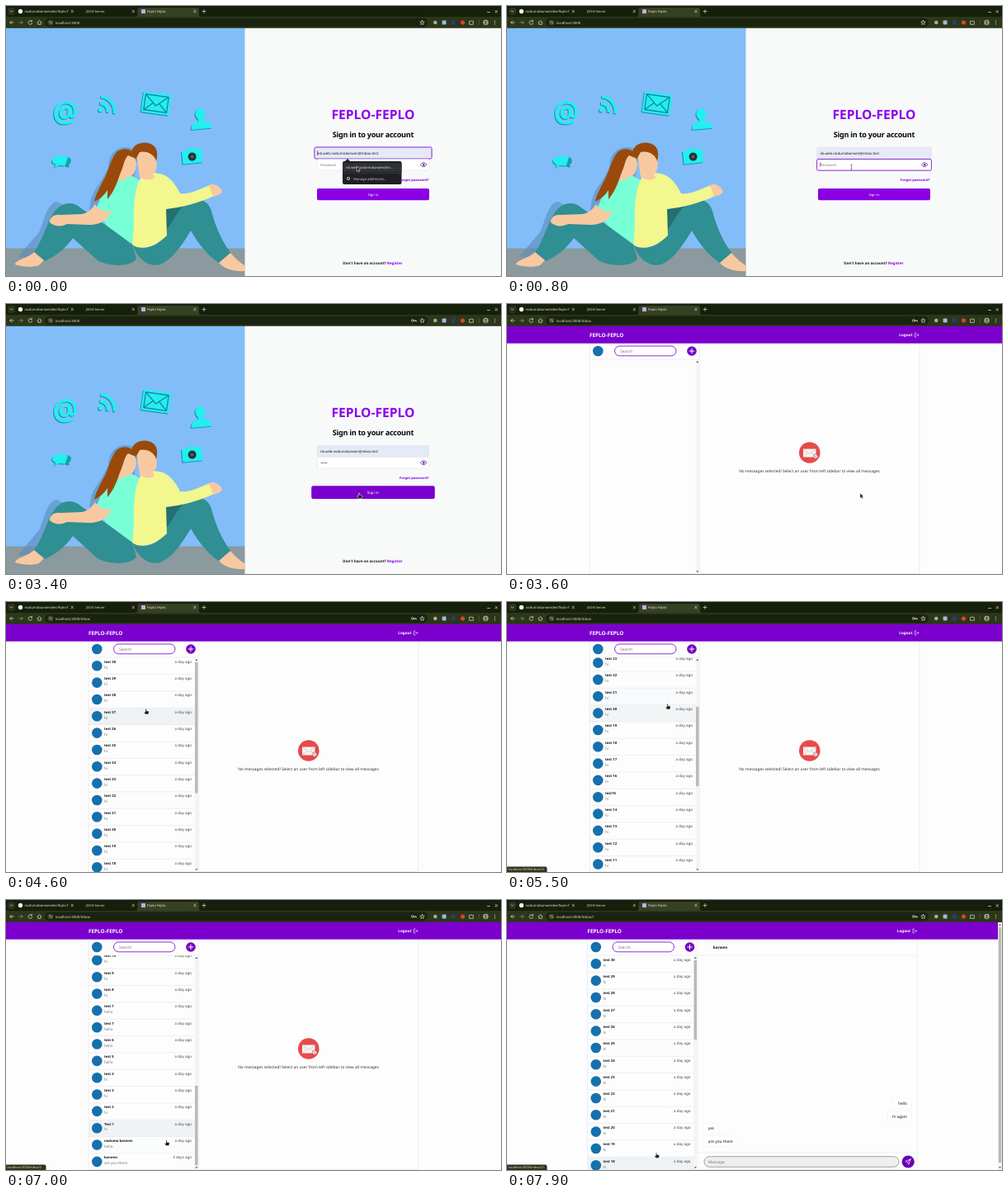
These frames come from a looping animation (600 px wide and 327 px high, 8 s). An HTML page:

```html
<!DOCTYPE html>
<html lang="en">
<head>
<meta charset="utf-8">
<title>Feplo Feplo</title>
<style>
  html, body { margin: 0; width: 100%; height: 100%; overflow: hidden; background: #f8faf9; }
  svg { display: block; width: 100vw; height: 100vh; }
  text { font-family: "Noto Sans", "Open Sans", sans-serif; font-size: 4.5px; fill: #17171b; text-rendering: geometricPrecision; }
  .b { font-weight: 700; }
  .m { font-weight: 600; }
  .mid { text-anchor: middle; }
  .end { text-anchor: end; }
  .purple { fill: #8e00ec; }
  .white { fill: #fff; }
  .grey { fill: #777; }
  .talk { font-size: 4.8px; }
  .ui { font-size: 4.2px; fill: #dfe4d2; }
  .line { fill: none; stroke: #dfe4d2; stroke-width: .7; stroke-linecap: round; stroke-linejoin: round; }
  .rule { stroke: #e3e5e8; stroke-width: .6; fill: none; }
  .skin { fill: #f8c9a0; }
  .teal { fill: #2f8f92; }
  .deep { fill: #24706f; }
  .hair { fill: #994a0a; }
  .shade { fill: #5c8cba; opacity: .6; }
  .icons { fill: #20f0ee; stroke: none; filter: drop-shadow(-1px 1px 0 #2389a8); }
  .stroke { fill: none; stroke: #20f0ee; stroke-width: 3.6; }
  .bubble { fill: #fff; stroke: #ececee; stroke-width: .5; }
</style>
</head>
<body>
<svg viewBox="0 0 600 327" preserveAspectRatio="none">
  <defs>
    <clipPath id="listClip"><rect x="100" y="67.3" width="133" height="260"/></clipPath>
    <clipPath id="artClip"><rect y="26" width="289.5" height="301"/></clipPath>
  </defs>

  <g id="login">
    <rect width="600" height="327" fill="#f8faf9"/>
    <g clip-path="url(#artClip)">
      <rect y="26" width="290" height="268" fill="#82bdfa"/>
      <rect y="293.5" width="290" height="34" fill="#8b9a9e"/>
      <g class="shade">
        <path d="M124 196C124 178 136 168 152 172L160 180 150 240 102 262C99 240 104 226 114 214Z"/>
        <path d="M86 250L62 237C50 238 47 258 40 274L14 304 40 304Z"/>
        <path d="M200 244L238 238 222 272 196 300Z"/>
      </g>
      <path class="teal" d="M158 306C152 316 128 316 112 309L81 281C72 294 60 303 47 309L34 298C45 283 49 263 58 250 66 238 81 235 91 245L119 264 152 285Z"/>
      <path class="skin" d="M34 298L46 308 40 314C32 317 20 316 11 313 12 307 26 306 34 298Z"/>
      <path d="M133 205C120 214 116 231 109 246 114 254 119 260 122 266L152 288 158 288 164 213C154 204 142 202 133 205Z" fill="#78ffd6"/>
      <path class="skin" d="M108 240C112 247 120 250 128 248 122 262 112 265 100 265L74 264C67 268 58 267 53 262 52 257 58 252 66 253L92 252C100 250 104 246 108 240Z"/>
      <path class="deep" d="M193 246L216 241 204 258 192 276Z"/>
      <path class="teal" d="M153 288C163 295 174 293 183 288 194 278 202 256 214 243 227 230 244 232 249 248 254 268 262 286 273 300L259 312C244 302 233 288 224 272 213 290 202 307 187 313 172 317 158 305 153 288Z"/>
      <path class="skin" d="M272 299C278 306 285 312 291 315V321C277 322 265 319 258 311Z"/>
      <path d="M165 206C157 215 154 240 155 266L153 289C164 297 181 292 195 278L194 246C212 244 233 239 252 230L247 217C234 222 222 229 211 227 206 217 200 208 190 204 180 201 171 202 165 206Z" fill="#f2f78e"/>
      <path class="skin" d="M246 217C252 214 259 218 262 224 260 230 255 229 251 231Z"/>
      <path class="skin" d="M158 179C167 173 179 177 182 185 184 195 182 201 178 203L180 208C175 212 168 211 162 207Z"/>
      <path class="hair" d="M152 179C152 169 162 164 172 166 183 168 185 178 182 188 180 180 171 175 162 177L158 184Z"/>
      <path class="skin" d="M136 186C142 175 156 178 158 190 158 202 152 208 146 208L140 212 131 208Z"/>
      <path class="hair" d="M158 185C156 173 142 170 134 177 126 186 124 202 117 213 112 223 108 230 107 237 115 233 120 228 123 223L123 234C130 226 135 214 138 204 143 194 143 185 148 181Z"/>
      <g class="icons">
        <text x="72" y="140.3" class="m mid" style="font-size:35px;fill:#20f0ee" transform="rotate(-8 72 130)">@</text>
        <g transform="translate(112.5 127.5) rotate(8)">
          <circle cx="2" cy="-2" r="2.8"/>
          <path class="stroke" d="M0-10A10 10 0 0 1 11 0M0-18A18 18 0 0 1 19 0"/>
        </g>
        <g transform="translate(182 118) rotate(8)">
          <rect x="-17" y="-12.5" width="34" height="25" rx="1"/>
          <path d="M-14-9.5H14V9.5H-14ZL0 3 14-9.5M-14 9.5L-4 0M14 9.5L4 0" fill="none" stroke="#2377a0" stroke-width="1.2"/>
        </g>
        <g transform="translate(236 137) rotate(-5)">
          <ellipse cy="-6" rx="6" ry="7"/>
          <path d="M-12.5 12C-12.5 4-7 5-3 2V-1H3V2C7 5 12.5 4 12.5 12Z"/>
        </g>
        <g transform="translate(225.5 181.5) rotate(-6)">
          <path d="M-12-7H-5L-3-9H4L6-7H12V9H-12Z"/>
          <circle r="5" cy="1" fill="#283038"/><circle r="2" cy="1" fill="#56606a"/>
        </g>
        <path d="M56 187C57 181 76 179 78 187 77 194 69 194 64 193L59 196 60 192C57 191 56 189 56 187Z"/>
        <path d="M75 183C80 184 80 190 76 192L77 195 72 193Z" fill="#159fae"/>
      </g>
    </g>

    <text x="445" y="136.6" class="mid purple" style="font-size:15.6px;font-weight:800">FEPLO-FEPLO</text>
    <text x="445" y="158.6" class="b mid" style="font-size:9.1px;letter-spacing:-.03em;fill:#08080c">Sign in to your account</text>
    <g id="email">
      <rect id="emailBox" x="377.3" y="171.3" width="135.4" height="13.4" rx="1.5" fill="#e5eaf7"/>
      <text x="381" y="179.6" style="font-size:4.15px">nb.web.nodumobarwen@mbox.test</text>
      <rect id="emailCaret" y="175.5" width=".5" height="5.5"/>
    </g>
    <g id="pass">
      <rect id="passBox" x="377.3" y="185.6" width="135.4" height="13.4" rx="1.5" fill="#fff"/>
      <text id="hint" x="381" y="193.6" class="grey" style="font-size:4.2px">Password</text>
      <g id="dots"></g>
      <rect id="passCaret" y="189.6" width=".5" height="5.2"/>
    </g>
    <path d="M502.4 192.2Q506.2 187.2 510 192.2 506.2 197.2 502.4 192.2Z" fill="none" stroke="#5a0f9c" stroke-width=".8"/>
    <circle cx="506.2" cy="192.2" r="1.2" fill="#5a0f9c"/>
    <text x="512.5" y="211.5" class="b end purple" style="font-size:4.05px">Forget password?</text>
    <g id="button">
      <rect id="buttonBox" x="377" y="221" width="136" height="14.2" rx="2"/>
      <text x="445" y="229.6" class="mid white" style="font-size:4.1px">Sign in</text>
    </g>
    <text x="444.5" y="312.7" class="b mid">Don't have an account? <tspan class="purple">Register</tspan></text>
    <g id="popup">
      <rect x="408" y="188" width="71.5" height="28" rx="2" fill="#1f2023"/>
      <rect x="408" y="190" width="71.5" height="11" fill="#303135"/>
      <path d="M408 202.5H479.5" stroke="#4a4b50" stroke-width=".5"/>
      <path d="M411 188L414 185 417 188Z" fill="#1f2023"/>
      <text x="412" y="196.8" style="font-size:4.1px;fill:#e4e4e6">nb.web.nodumobarwen@m…</text>
      <circle cx="415" cy="209" r="1.6" fill="none" stroke="#c9c9cc" stroke-width="1"/>
      <text x="421" y="210.6" style="font-size:4.2px;fill:#c9c9cc">Manage addresses...</text>
    </g>
  </g>

  <g id="inbox">
    <rect width="600" height="327" fill="#fdfdfd"/>
    <rect y="26" width="600" height="21.7" fill="#7c00cd"/>
    <g id="page">
      <text x="100" y="39.8" class="b white" style="font-size:6.4px">FEPLO-FEPLO</text>
      <text x="491.5" y="39.2" class="b end white" style="font-size:4.6px">Logout</text>
      <path d="M496.5 35H494.5V40H496.5M496 37.5H499M498 36.4L499.2 37.5 498 38.6" fill="none" stroke="#fff" stroke-width=".6"/>
      <path class="rule" d="M100 48V327M233.4 48V327M500 48V327M100 67H233M100 326.5H500"/>
      <circle cx="110.3" cy="57" r="6.3" fill="#1670ac"/>
      <rect x="130.5" y="51" width="74.5" height="11.8" rx="5.9" fill="#fff" stroke="#8417d0" stroke-width=".9"/>
      <text x="137" y="58.7" class="grey talk">Search</text>
      <circle cx="224" cy="57" r="5.8" fill="#7500c4"/>
      <path d="M220.8 57H227.2M224 53.8V60.2" stroke="#fff" stroke-width="1"/>
      <g clip-path="url(#listClip)">
        <g id="rows"></g>
        <rect x="228.7" y="67" width="4.5" height="260" fill="#f4f4f4"/>
        <rect id="thumb" x="229.1" width="3.4" fill="#b9b9bb"/>
        <path d="M229.5 71L230.9 69 232.3 71ZM229.5 323.2L230.9 325.2 232.3 323.2Z" fill="#555"/>
      </g>
      <g id="empty">
        <circle cx="366.8" cy="180" r="12.8" fill="#e84a4a"/>
        <path d="M359 175.5H374.5V185.5H359Z" fill="#f5f3f0"/>
        <path d="M359 175.5L366.8 181.5 374.5 175.5M359 185.5L364.5 180M374.5 185.5L369 180" fill="none" stroke="#cfc6c2" stroke-width=".7"/>
        <circle cx="374" cy="184.6" r="2.7" fill="#fff" stroke="#b0494f" stroke-width=".7"/>
        <path d="M372.8 183.4L375.2 185.8M375.2 183.4L372.8 185.8" stroke="#c33" stroke-width=".6"/>
        <text x="366.5" y="204" class="mid" style="font-size:4.82px;fill:#333">No messages selected! Select an user from left sidebar to view all messages</text>
      </g>
      <g id="chat">
        <path class="rule" d="M233 67H500M233 306H500"/>
        <text x="252.3" y="58.7" class="m" style="font-size:4.6px">barwen</text>
        <rect class="bubble" x="470" y="240" width="23" height="12.5" rx="1.5"/>
        <rect class="bubble" x="464" y="255.5" width="29" height="12.5" rx="1.5"/>
        <rect class="bubble" x="240.5" y="270.2" width="18" height="12.5" rx="1.5"/>
        <rect class="bubble" x="240.5" y="285.5" width="39" height="12.5" rx="1.5"/>
        <text x="487.5" y="248.2" class="end talk">hello</text>
        <text x="487.5" y="263.6" class="end talk">hi again</text>
        <text x="246.2" y="278.2" class="talk">yes</text>
        <text x="246.2" y="293.5" class="talk">are you there</text>
        <rect x="241.5" y="310.7" width="236" height="12.6" rx="6.3" fill="#efeff1" stroke="#8d8d92" stroke-width=".8"/>
        <text x="246.5" y="318.7" class="grey talk">Message</text>
        <circle cx="488.7" cy="317" r="7.6" fill="#6a00b4"/>
        <path d="M492 313.6L485.4 316.4 488 317.6 489.2 320.4ZM488 317.6L492 313.6" fill="none" stroke="#fff" stroke-width=".7"/>
      </g>
    </g>
    <g id="pageBar">
      <rect x="595" y="27" width="5" height="300" fill="#f4f4f4"/>
      <rect x="595.8" y="33" width="3.4" height="285" fill="#b9b9bb"/>
      <path d="M596.1 31L597.5 29 598.9 31ZM596.1 323L597.5 325 598.9 323Z" fill="#555"/>
    </g>
    <g id="status">
      <path d="M0 320.5H46.5Q48.5 320.5 48.5 322.5V327H0Z" fill="#2b351b"/>
      <text id="link" x="1.5" y="325.3" class="ui" style="font-size:3.9px"></text>
    </g>
  </g>

  <g id="browser">
    <rect width="600" height="13.5" fill="#161f0b"/>
    <rect y="13" width="600" height="13.8" fill="#2c3719"/>
    <path d="M157 13.2Q159.5 13 159.5 10.5V4.5Q159.5 2 162 2H231.5Q234 2 234 4.5V10.5Q234 13 236.5 13.2Z" fill="#364123"/>
    <rect x="2" y="2" width="9" height="9" rx="3" fill="#2a331a"/>
    <path class="line" d="M5 5.8L6.5 7.3 8 5.8"/>
    <circle cx="17.5" cy="6.5" r="2.7" fill="#f0f2ec"/>
    <text x="22.5" y="8" class="ui">nodumobarwendev/feplo-f</text>
    <text x="97" y="8" class="ui" style="font-size:4px">JSON Server</text>
    <rect x="164" y="4" width="5" height="5" rx=".6" fill="#c8a8f0"/>
    <text x="171" y="8" class="ui">Feplo Feplo</text>
    <path class="line" d="M79 5.2L81.6 7.8M81.6 5.2L79 7.8M153 5.2L155.6 7.8M155.6 5.2L153 7.8M227.6 5.2L230.2 7.8M230.2 5.2L227.6 7.8M238 6.5H242M240 4.5V8.5M583.5 7.5H586.5M593 5.5L595.6 8M595.6 5.5L593 8"/>
    <path class="line" d="M9.3 20H4.8M6.8 18L4.8 20 6.8 22"/>
    <path class="line" d="M15.8 20H20.2M18.2 18L20.2 20 18.2 22" opacity=".55"/>
    <path class="line" d="M31 18.4A2.3 2.3 0 1 0 31.6 20.6M31.4 17.3V18.8H29.9"/>
    <path class="line" d="M38 20L40.5 17.6 43 20M38.8 19.5V22.3H42.2V19.5"/>
    <rect x="47" y="14.8" width="464" height="10.4" rx="5.2" fill="#1a230f"/>
    <circle cx="54" cy="20" r="3.6" fill="#353e21"/>
    <path class="line" d="M52.4 19H53.8M54.6 21H55.8M55.3 19H55.4M52.8 21H52.9"/>
    <text id="url" x="60" y="21.6" class="ui" style="font-size:4.3px"></text>
    <g id="key"><circle class="line" cx="492.8" cy="20" r="1.4"/><path class="line" d="M494.3 20H497.3V21.3M496 20V21"/></g>
    <path class="line" d="M504.5 17.4L505.3 19.2 507.2 19.3 505.8 20.6 506.2 22.5 504.5 21.5 502.8 22.5 503.2 20.6 501.8 19.3 503.7 19.2Z"/>
    <circle cx="520.3" cy="20" r="2.3" fill="#a9aea0"/>
    <rect x="528.6" y="17.6" width="5" height="5" rx="1" fill="#9db8ea"/>
    <rect x="540" y="17.6" width="4.6" height="5" rx=".6" fill="#33357f"/>
    <circle cx="553.5" cy="20" r="2.6" fill="#d6462f"/>
    <path class="line" d="M563 18.5H564.3A1 1 0 0 1 566.2 18.5H567.3V22.3H563Z" transform="translate(-1 0)"/>
    <path d="M573.5 17V23" stroke="#5a6444" stroke-width=".6"/>
    <circle cx="581.5" cy="20" r="3.2" fill="#a9a79a"/><circle cx="581.5" cy="19.3" r="1.2" fill="#4d4a42"/><path d="M579.3 22.3Q581.5 19.3 583.7 22.3Z" fill="#4d4a42"/>
    <g fill="#dfe4d2"><circle cx="592.5" cy="18" r=".6"/><circle cx="592.5" cy="20" r=".6"/><circle cx="592.5" cy="22" r=".6"/></g>
  </g>

  <g id="cursor" stroke-linejoin="round">
    <path id="arrow" d="M0 0V6.2L1.5 5 2.5 7.2 3.5 6.7 2.5 4.6H4.4Z" fill="#111" stroke="#fff" stroke-width=".5"/>
    <path id="hand" d="M-.6 0Q0-.7.6 0V2.2L3 2.7Q3.8 3 3.6 4L3 6.4H-.6L-2.4 3.8Q-2 3-.6 4Z" fill="#111" stroke="#fff" stroke-width=".5"/>
    <path id="beam" d="M-1-2.8H1M0-2.8V2.8M-1 2.8H1" fill="none" stroke="#7a2436" stroke-width=".6"/>
  </g>
</svg>

<script>
const LOOP = 8000, STEP = 100, TOP = 67.3, PITCH = 20.33, VIEW = 260;
const $ = id => document.getElementById(id);
const show = (id, on) => $(id).setAttribute('display', on ? 'inline' : 'none');
const set = (id, attrs) => { for (const k in attrs) $(id).setAttribute(k, attrs[k]); };

// Eased value at time t from [time, value] stops
function track(stops, t) {
  if (t <= stops[0][0]) return stops[0][1];
  for (let i = 1; i < stops.length; i++) {
    const [t0, a] = stops[i - 1], [t1, b] = stops[i];
    if (t <= t1) {
      const p = (t - t0) / (t1 - t0);
      return a + (b - a) * p * p * (3 - 2 * p);
    }
  }
  return stops[stops.length - 1][1];
}

const mouseX = [[0, 425], [200, 425], [800, 417.5], [2400, 417.5], [3000, 428], [3800, 428], [4500, 169.5], [4800, 169.5], [5300, 194.5], [7600, 194.5], [7900, 181]];
const mouseY = [[0, 194], [200, 194], [800, 195], [2400, 195], [3000, 229], [3800, 229], [4500, 129.5], [4800, 129.5], [5300, 123.5], [6200, 123.5], [7000, 291], [7400, 313], [7600, 313], [7900, 306]];
const scrolls = [[4900, 0], [5400, 146], [5600, 146], [6000, 296], [6500, 411]];
const emailGrow = [[700, 1.05], [900, 1]];
const passGrow = [[700, 1], [900, 1.05], [3100, 1.05], [3300, 1]];
const buttonGrow = [[2700, 1], [3000, 1.1]];

const rowInfo = i => {
  const n = i <= 23 ? 30 - i : 31 - i;
  const name = i === 31 ? 'nodumo barwen' : i === 32 ? 'barwen' : n === 15 ? 'test15' : n === 1 ? 'Test 1' : 'test ' + n;
  const note = i === 32 ? 'are you there' : i === 31 || (i > 22 && i < 27) ? 'hello' : 'hi';
  return [name, note, i === 32 ? '3 days ago' : 'a day ago'];
};

$('rows').innerHTML = Array.from({ length: 33 }, (_, i) => {
  const [name, note, when] = rowInfo(i);
  return `<g transform="translate(100 ${TOP + i * PITCH})">
    <rect width="129" height="${PITCH}" fill="#eef2f4" opacity="0"/>
    <path class="rule" d="M0 ${PITCH}H129"/>
    <circle cx="10.3" cy="10" r="6.3" fill="#1670ac"/>
    <text x="19" y="6.4" class="m" style="font-size:4.2px">${name}</text>
    <text x="19" y="13.3" class="grey">${note}</text>
    <text x="125" y="6.4" class="end" style="fill:#444">${when}</text></g>`;
}).join('');
const rows = [...$('rows').children];

$('dots').innerHTML = Array.from({ length: 6 }, (_, i) =>
  `<circle cx="${382 + i * 1.35}" cy="192.2" r=".5" fill="#222"/>`).join('');

const scrollAt = t => t >= 7700 ? 0 : track(scrolls, t);

function hoverAt(t) {
  const x = track(mouseX, t), y = track(mouseY, t);
  if (t >= 7800) return 12;
  if (t < 3900 || x < 100 || x > 229 || y < TOP) return -1;
  return Math.floor((y + 2 - TOP + scrollAt(t)) / PITCH);
}

const grow = (id, s, cx, cy) => set(id, { transform: `translate(${cx} ${cy}) scale(${s}) translate(${-cx} ${-cy})` });
const ring = (id, on) => set(id, { stroke: on ? '#8417d0' : '#dcdce2', 'stroke-width': on ? .9 : .5 });

function drawLogin(t) {
  const typed = Math.max(0, Math.min(6, (t - 1000) / STEP));
  const passFocus = t >= 800 && t < 3200;
  grow('email', track(emailGrow, t), 445, 178);
  grow('pass', track(passGrow, t), 445, 192.3);
  grow('button', track(buttonGrow, t), 445, 228.1);
  ring('emailBox', t < 800);
  ring('passBox', passFocus);
  show('emailCaret', t < 800);
  set('emailCaret', { x: t < 300 ? 380.6 : 451.5 });
  show('passCaret', passFocus && (t < 1700 || (t >= 2000 && t < 2500) || t >= 3000));
  set('passCaret', { x: 381.2 + typed * 1.35 });
  show('hint', typed === 0);
  [...$('dots').children].forEach((d, i) => d.setAttribute('opacity', i < typed ? 1 : 0));
  set('buttonBox', { fill: t >= 2800 ? '#7a00cd' : '#8b00e2' });
  show('popup', t < 300);
}

function drawInbox(t) {
  const chat = t >= 7700, scroll = scrollAt(t), count = t < 5500 ? 20 : 33;
  const full = count * PITCH, size = 248 * VIEW / full;
  set('page', { transform: `translate(${chat ? -2.5 : 0} 0)` });
  set('rows', { transform: `translate(0 ${-scroll})` });
  set('thumb', { y: 73 + (248 - size) * scroll / (full - VIEW), height: size });
  const trail = [[hoverAt(t), .2], [hoverAt(t - 100), .5], [hoverAt(t - 200), .3]];
  rows.forEach((row, i) => {
    row.setAttribute('display', t >= 3800 && i < count ? 'inline' : 'none');
    row.firstElementChild.setAttribute('opacity', trail.reduce((sum, [k, w]) => sum + (k === i ? w : 0), 0));
  });
  show('thumb', t >= 3800);
  show('chat', chat);
  show('empty', !chat);
  show('pageBar', chat);
  const over = hoverAt(t);
  show('status', t >= 4900 && over >= 0);
  $('link').textContent = 'localhost:3000/inbox/' + (33 - over);
}

function draw(t) {
  const inside = t >= 3600;
  show('login', !inside);
  show('inbox', inside);
  if (inside) drawInbox(t); else drawLogin(t);
  $('url').textContent = 'localhost:3000' + (t >= 7700 ? '/inbox/1' : inside ? '/inbox' : '');
  show('key', t >= 1100);
  const beam = t >= 300 && t < 2600;
  const hand = (t >= 2800 && t < 3600) || hoverAt(t) >= 0;
  show('beam', beam);
  show('hand', hand);
  show('arrow', !beam && !hand);
  set('cursor', { transform: `translate(${track(mouseX, t)} ${track(mouseY, t)})` });
}

const start = performance.now();
function tick() {
  draw(Math.floor((performance.now() - start) % LOOP / STEP) * STEP);
  requestAnimationFrame(tick);
}
tick();
</script>
</body>
</html>
```
